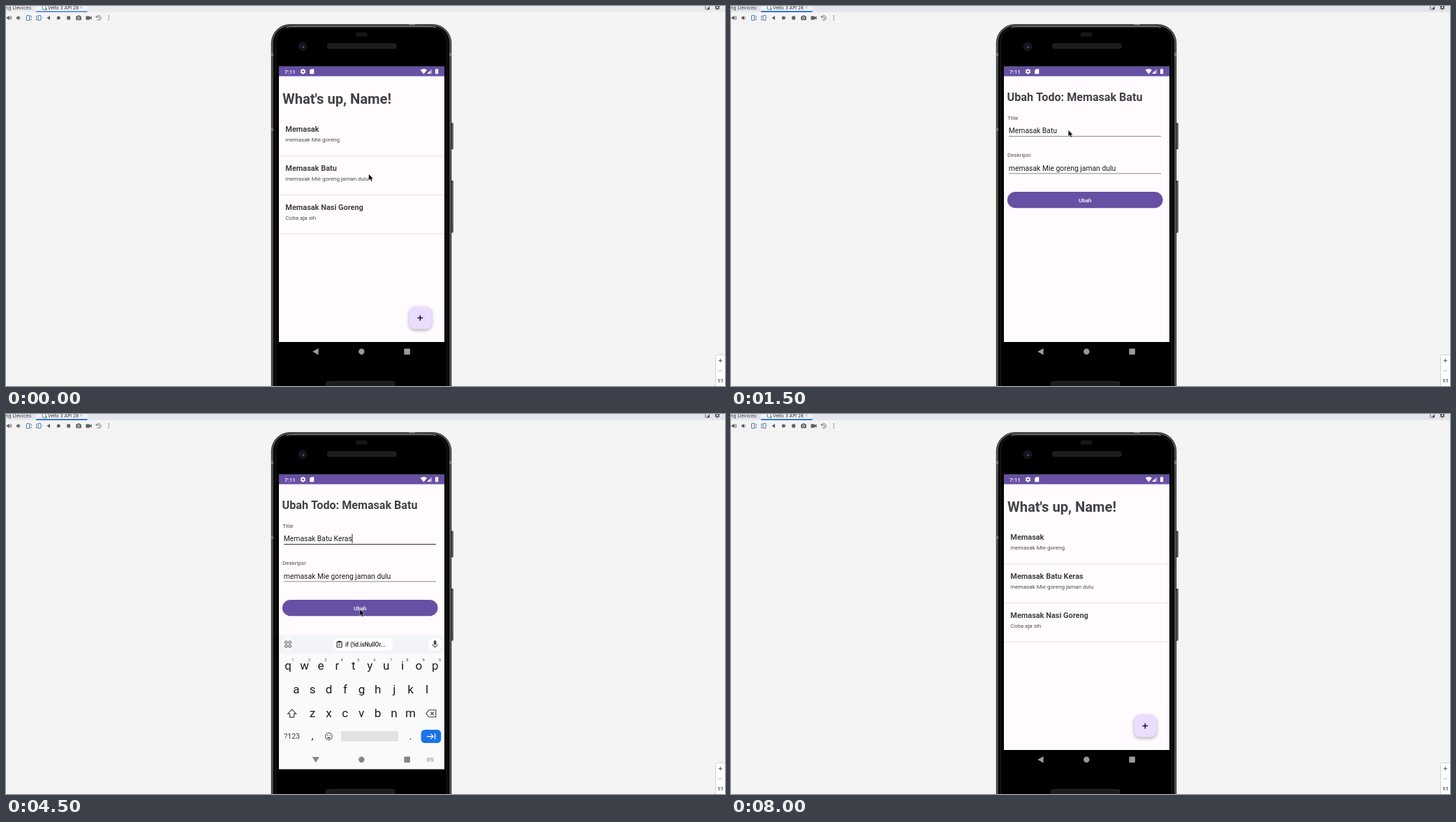
An HTML page with a canvas for the animation above (8300 ms loop, 1030 px wide and 544 px high).

```html
<!DOCTYPE html>
<html lang="id">
<head>
<meta charset="utf-8">
<title>Todo</title>
<style>
html, body { margin: 0; width: 100%; height: 100%; overflow: hidden; background: #f4f4f4; }
canvas { display: block; }
</style>
</head>
<body>
<canvas id="stage" width="1030" height="544"></canvas>
<script>
const ctx = document.getElementById('stage').getContext('2d');
const LOOP = 8300, STEP = 100;
const PURPLE = '#6750a4', PAPER = '#fffbff', INK = '#434147', KEY = '#1b1c1f', ICON = '#5f6064';
// Phone screen: left, top, width, end of status bar, start of navigation bar, bottom.
const LEFT = 390.8, TOP = 86.6, WIDTH = 237.2, BAR = 100.5, NAV = 481, BOTTOM = 508.7;
const clamp = v => Math.max(0, Math.min(1, v));

function box(x, y, w, h, r, fill, stroke, lw = 1) {
  ctx.beginPath();
  ctx.roundRect(x, y, w, h, r);
  if (fill) { ctx.fillStyle = fill; ctx.fill(); }
  if (stroke) { ctx.strokeStyle = stroke; ctx.lineWidth = lw; ctx.stroke(); }
}
const dot = (x, y, r, fill, stroke, lw) => box(x - r, y - r, 2 * r, 2 * r, r, fill, stroke, lw);
const band = (y, end, fill) => box(LEFT, y, WIDTH, end - y, 0, fill);

function text(s, x, y, size, color = INK, weight = 400, align = 'left', font = 'Roboto') {
  ctx.font = `${weight} ${size}px ${font}, sans-serif`;
  ctx.fillStyle = color;
  ctx.textAlign = align;
  ctx.fillText(s, x, y);
}

function path(d, x, y, fill, stroke, lw = 1) {
  const p = new Path2D(d);
  ctx.save();
  ctx.translate(x, y);
  if (fill) { ctx.fillStyle = fill; ctx.fill(p); }
  if (stroke) { ctx.strokeStyle = stroke; ctx.lineWidth = lw; ctx.stroke(p); }
  ctx.restore();
}

function group(draw, dx = 0, dy = 0, alpha = 1) {
  ctx.save();
  ctx.translate(dx, dy);
  ctx.globalAlpha *= alpha;
  draw();
  ctx.restore();
}

function clipBand(y, end, draw) {
  ctx.save();
  ctx.beginPath();
  ctx.rect(LEFT, y, WIDTH, Math.max(0, end - y));
  ctx.clip();
  draw();
  ctx.restore();
}

function gear(x, y, r, color, hole) {
  for (let i = 0; i < 6; i++) {
    const a = i * Math.PI / 3 + Math.PI / 6;
    path(`M0 0L${Math.cos(a) * r} ${Math.sin(a) * r}`, x, y, null, color, r * .55);
  }
  dot(x, y, r * .76, color);
  dot(x, y, r * .36, hole);
}

function ideBars(active) {
  const strip = active ? '#e2e5ed' : '#e9ebf0';
  box(0, 0, 1030, 544, 0, '#f4f4f4');
  box(0, 0, 1030, 8.5, 0, strip);
  box(0, 25, 1030, .7, 0, '#ececee');
  text('ning Devices:', 38, 4.8, 7, '#3a3b3f', 400, 'right', 'Inter');
  box(43, 0, 73.5, 7, 0, '#f0f3fa');
  box(43, 7, 73.5, 2, 0, active ? '#3574d6' : '#6f97d4');
  box(52, -1, 5, 6, 1, null, '#6c707e', .9);
  dot(57.5, 4.5, 1.5, '#59a869');
  text('Velto 3 API 28', 60, 4.8, 6.6, '#222327', 400, 'left', 'Inter');
  path('M-1.6 -1.6L1.6 1.6M1.6 -1.6L-1.6 1.6', 108, 2, null, '#9a9da6', .7);
  box(1002, -1, 5.5, 6, .5, null, '#555', .9);
  box(1005, 2, 3, 3, 0, '#555');
  gear(1019, 2, 3.5, '#555', strip);

  for (const [x, wave] of [[4, 1], [18, 0]]) {
    path('M-3 -1.4H-1.3L1 -3.2V3.2L-1.3 1.4H-3Z', x, 17, ICON);
    path(wave ? 'M2 -1.5Q3 0 2 1.5M2.6 -3Q5 0 2.6 3' : 'M2 -1.5Q3 0 2 1.5', x, 17, null, ICON, .8);
  }
  for (const [x, flip] of [[32.5, 1], [47, -1]]) {
    box(x - 2 - flip, 13.5, 4, 7, .6, null, '#3b7fc0', 1);
    path(`M${flip * 2} -3.3Q${flip * 4} -3 ${flip * 3.5} 0M${flip * 3.5} 1V3H${flip * 2}`, x, 17, null, ICON, .9);
  }
  path('M-2.6 0L2 -2.9V2.9Z', 61, 17, ICON);
  dot(75.3, 17, 2.5, ICON);
  box(87.3, 14.6, 4.8, 4.8, .3, ICON);
  box(100.3, 14.4, 7.6, 5.8, 1, ICON);
  box(102.3, 13.4, 3.6, 2, .5, ICON);
  dot(104.1, 17.2, 1.5, null, '#f7f8f9', .8);
  box(114.4, 14.4, 5.6, 5.3, .7, ICON);
  path('M0 -1L2.6 -2.4V2.4L0 1Z', 120, 17, ICON);
  path('M-3 -1.2A3.2 3.2 0 1 1 -2.6 2M-3.8 -3V-.8H-1.6M0 -1.8V.2L1.5 1', 133, 17, null, ICON, .9);
  for (const d of [-2.7, 0, 2.7]) dot(147.3, 17 + d, .8, ICON);

  box(1016.5, 499.5, 18, 50, 2, '#fff', '#cfd0d4', 1);
  path('M-2.7 0H2.7M0 -2.7V2.7', 1023.3, 507.7, null, '#444', .9);
  path('M-2.7 0H2.7', 1023.3, 522, null, '#aaa', .9);
  text('1:1', 1023.3, 538.8, 6.5, '#333', 600, 'center', 'Inter');
}

function phone() {
  for (const [y, h] of [[167.5, 37.5], [250, 74.5]]) {
    box(637, y, 3.8, h, 1, '#3c3c3c');
    box(638.7, y + 1.5, 1, h - 3, 0, '#777');
  }
  // Nested outlines of the metal rim: inset and colour.
  const rim = [[0, '#1c1c1c'], [1, '#6a6a6a'], [2.3, '#2a2a2a'], [3.6, '#000'], [6, '#2c2c2c'], [6.8, '#000']];
  for (const [d, color] of rim)
    box(379.8 + d, 26 + d * .8, 258.4 - 2 * d, 560, 27 - d, color);
  path('M402 30.4Q406 29.4 412 29.4H606Q612 29.4 616 30.4', 0, 0, null, '#999', 1);
  for (const [x, y, w, h] of [[379.8, 67, 3, 5], [635.2, 67, 3, 5], [379.8, 175, 3, 4], [577, 26, 9, 1.6]])
    box(x, y, w, h, 0, '#777');
  box(500.5, 37.5, 17.5, 6.5, 3, '#151515');
  box(460.5, 54, 98.5, 6.8, 3, '#1c1c1c', '#303030', .8);
  box(458.5, 537.5, 98.5, 8, 3, '#1c1c1c', '#303030', .8);
  dot(425, 58, 5.6, '#11121a', '#222228', 1);
  dot(425, 58, 2.8, '#171b36');
  dot(426, 59, 1, '#4f69b4');
}

function statusIcons() {
  text('7:11', 399, 96.8, 8.06, '#fff', 500);
  gear(425.5, 93.7, 3.8, '#fff', PURPLE);
  path('M-1 -3.5H3V3.5H-3V-1.5Z', 438.2, 93.7, '#fff');
  path('M0 3.8L-4.8 -2Q0 -5.2 4.8 -2Z', 598.3, 93.6, '#fff');
  path('M-3.5 3.5H3.5V-3.5Z', 606.6, 93.6, 'rgba(255,255,255,.45)');
  path('M-3.5 3.5H1V-1Z', 606.6, 93.6, '#fff');
  box(615, 90.6, 4.2, 6.6, .6, '#fff');
  box(616.2, 89.8, 1.8, 1, 0, '#fff');
}

function fab() {
  ctx.save();
  ctx.shadowColor = 'rgba(0,0,0,.3)';
  ctx.shadowBlur = 5;
  ctx.shadowOffsetY = 2;
  box(577.3, 430.3, 32.5, 32.3, 9, '#eaddff');
  ctx.restore();
  path('M-3.9 0H3.9M0 -3.9V3.9', 593.3, 446.6, null, '#21005d', 1.5);
}

// Window with the list of todos; shift moves it, bar is the offset of its status bar.
function listWindow({ title = 'Memasak Batu', shift = 0, bar = shift, resized = false, dim = 0, press = 0 }) {
  band(TOP, NAV, PAPER);
  band(TOP, BAR + bar, PURPLE);
  clipBand(TOP, NAV, () => group(() => {
    text("What's up, Name!", 396, 139.8, 20.2, INK, 700);
    const items = [['Memasak', 'memasak Mie goreng'], [title, 'memasak Mie goreng jaman dulu'],
      ['Memasak Nasi Goreng', 'Coba aja sih']];
    items.forEach(([head, body], i) => {
      const y = i * 55.85;
      if (i === 1 && press) band(214.8, 270.3, `rgba(0,0,0,${press})`);
      text(head, 400.3, 180 + y, 10.94, INK, 700);
      text(body, 400.3, 194.4 + y, 8.06, '#4d4a51');
      band(214 + y, 214.7 + y, '#dfdae0');
    });
    if (resized) box(625.3, 158.5, 2.3, 154, 0, '#99959b');
  }, 0, shift));
  group(fab, 0, resized ? -169.5 : 0);
  if (dim) band(TOP, NAV, `rgba(0,0,0,${dim})`);
}

function typed(t) {
  const tail = t < 2800 ? '' : t < 2900 ? ' K' : t < 3000 ? ' Ke' : t < 3200 ? ' Kera' : ' Keras';
  return 'Memasak Batu' + tail;
}

function editWindow(t) {
  const focus = t >= 1700, value = typed(t);
  band(TOP, NAV, PAPER);
  band(TOP, BAR, PURPLE);
  text('Ubah Todo: Memasak Batu', 395.6, 135.8, 16.13, INK, 700);
  text('Title', 396, 163, 8.06, '#4d4a51');
  text(value, 397.8, 182.2, 10.37, '#1d1b20');
  const end = 398 + ctx.measureText(value).width;
  box(398, 186, 218, focus ? 1.1 : .8, 0, focus ? '#33313a' : '#66626a');
  text('Deskripsi', 396, 216.4, 8.06, '#4d4a51');
  text('memasak Mie goreng jaman dulu', 397.8, 235.6, 10.37, '#1d1b20');
  box(398, 239.4, 218, .8, 0, '#66626a');
  box(395.8, 266, 222.8, 23.2, 11.6, PURPLE);
  if (t >= 4100 && t < 4500) {
    ctx.save();
    box(395.8, 266, 222.8, 23.2, 11.6);
    ctx.clip();
    dot(507, 280, 60 + (t - 4100) * .6, 'rgba(255,255,255,.13)');
    ctx.restore();
  }
  text('Ubah', 507.2, 280.6, 8.06, '#fff', 500, 'center');
  if (focus && (t < 3500 || t >= 4100)) box(end - .4, 171.5, 1, 13.5, 0, '#2c2833');
  if (focus && t < 2800) {
    path('M0 -7L4.4 -3H-4.4Z', 467.2, 192.4, '#625b71');
    dot(467.2, 192.6, 5.8, '#625b71');
  }
}

function keyRow(keys, x, y) {
  [...keys].forEach((k, i) => text(k, x + i * 23.4, y, 17, KEY, 400, 'center'));
}

function keyboard(pill) {
  band(316.6, NAV + 1, '#f8fafc');
  band(316.6, 343, '#f2f4f8');
  dot(404, 329.6, 9.5, '#f8f9fb');
  for (const dx of [0, 5.4]) for (const dy of [0, 5.4])
    box(399.6 + dx, 325.2 + dy, 3.4, 3.4, .8, null, '#44474b', 1);
  if (pill) {
    ctx.save();
    ctx.translate(511.5, 329.6);
    ctx.scale(pill, pill);
    box(-42.3, -8.8, 84.6, 17.6, 6, '#fff');
    box(-37.4, -3.6, 7, 8, .8, null, '#222', 1.1);
    box(-35.7, -4.8, 3.6, 2.4, .5, '#222');
    path('M-35.7 -.4H-32M-35.7 1.8H-33', 0, 0, null, '#222', .8);
    text('if (!id.isNullOr...', -25.5, 2.9, 8.3, '#202124', 500);
    ctx.restore();
  }
  dot(614.5, 329.6, 9.5, '#fff');
  box(612.8, 324, 3.6, 6.8, 1.8, '#44474b');
  path('M-3.7 -.4A3.7 3.7 0 0 0 3.7 -.4M0 3.4V5.6', 614.6, 329.6, null, '#44474b', 1);

  keyRow('qwertyuiop', 404.2, 366);
  for (let i = 0; i < 10; i++)
    text((i + 1) % 10, 411 + i * 23.4, 354, 5.8, '#44474b', 400, 'center');
  keyRow('asdfghjkl', 415.8, 400);
  keyRow('zxcvbnm', 439, 433.8);
  path('M0 -6L6 .3H3V5.3H-3V.3H-6Z', 409.6, 428.8, null, '#3c4043', 1.1);
  path('M-7 0L-3 -5H7V5H-3ZM-.6 -2.3L4 2.3M4 -2.3L-.6 2.3', 608.8, 428.8, null, '#3c4043', 1.1);
  text('?123', 409.6, 465.4, 10.6, '#3c4043', 400, 'center');
  text(',', 439, 465.6, 15, KEY, 400, 'center');
  dot(462.4, 461.5, 5, null, '#3c4043', 1);
  dot(460.6, 460.2, .8, '#3c4043');
  dot(464.2, 460.2, .8, '#3c4043');
  path('M-2.8 1A3 3 0 0 0 2.8 1Z', 462.4, 461.8, '#3c4043');
  box(480, 454, 82, 14.8, 1.5, '#e1e2e4');
  text('.', 579.6, 465.6, 15, KEY, 400, 'center');
  box(594.6, 452, 28.6, 19, 5.5, '#1a73e8');
  path('M-6 0H3M-.3 -3.5L3.2 0L-.3 3.5M5.8 -4V4', 608.8, 461.6, null, '#fff', 1.3);
}

function navBar(t) {
  const light = t >= 2000 && t < 5200, down = t >= 2000 && t < 4800;
  const color = light ? '#858585' : '#9a9a9a';
  if (light) band(NAV, BOTTOM, t < 2300 ? '#f0f0f0' : '#fafafa');
  path(down ? 'M-5 -3.8H5L0 4.4Z' : 'M-4.6 0L3.8 -4.8V4.8Z', 443.8, 494.8, color);
  dot(509.3, 494.8, 4.2, color);
  box(570.3, 490.5, 8.6, 8.6, .8, color);
  if (down) {
    box(602.8, 492, 9.6, 5.6, .6, '#bdbdbd');
    for (let i = 0; i < 4; i++) box(603.9 + i * 2.1, 493.2, 1.1, 1, 0, '#fff');
    box(605.2, 495.5, 4.8, .9, 0, '#fff');
  }
}

function toast(alpha) {
  group(() => {
    box(453, 438.5, 113, 28.6, 14.3, '#f0f1f1');
    text('Berhasil merubah Todo!', 509.4, 456.2, 8.06, '#353439', 400, 'center');
  }, 0, 0, alpha);
}

function screen(t) {
  if (t < 700) {
    listWindow({ press: t < 400 ? 0 : t < 600 ? .06 : .1 });
  } else if (t < 1200) {
    const rest = 1 - clamp((t - 700) / 425);
    const out = 1 - rest ** 1.5;
    const off = 17 * rest ** 2.2;
    listWindow({ shift: -8 * out, dim: Math.min(.11, out * .18) });
    const top = TOP + off + 422 * rest ** 4.75;
    clipBand(top, NAV + off, () => group(() => editWindow(t), 0, off));
  } else if (t < 4800) {
    editWindow(t);
  } else if (t < 5100) {
    listWindow({ shift: -7.6, bar: -5, resized: true, dim: .09 });
    if (t < 4900) clipBand(125, 495, () => group(() => editWindow(t), 0, 2));
  } else {
    listWindow({ title: 'Memasak Batu Keras', shift: t < 5200 ? -2 : 0, dim: t < 5200 ? .03 : 0 });
  }
  statusIcons();

  if (t > 1900 && t < 5200) {
    let off = t < 2400 ? 192 * (1 - (t - 1900) / 400) ** 3.8 || 0 : 0;
    if (t >= 4800) off = t < 5100 ? 1 : 60;
    const pill = t < 2200 ? 0 : 1 - .09 * clamp((2400 - t) / 200);
    clipBand(TOP, NAV + 1, () => group(() => keyboard(pill), 0, off, t < 5100 ? 1 : .5));
  }
  navBar(t);
  if (t >= 5100 && t < 7100) toast(t < 5200 ? .5 : 1 - clamp((t - 6700) / 400));
}

// Pointer stops as [time, x, y], linear between.
const TRACK = [[0, 519.6, 240.6], [100, 518.8, 241], [1000, 518.8, 241], [1200, 487, 218], [1300, 486, 199],
  [1400, 484, 184], [1500, 483.2, 177.6], [3400, 483.2, 177.6], [3500, 489, 203], [3600, 499, 245],
  [3700, 505, 270], [3800, 506.8, 279.8], [6600, 506.8, 279.8], [6700, 507, 279], [7500, 507, 279],
  [7600, 102, 37], [7700, 102, 37], [7800, 72, 19], [7900, 26, 1]];

function pointer(t) {
  if (t >= 8000) return;
  const i = Math.max(1, TRACK.findIndex(p => p[0] >= t));
  const [a, b] = [TRACK[i - 1], TRACK[i]];
  const u = (t - a[0]) / (b[0] - a[0]);
  path('M0 0V9L2.1 7.2L3.6 10.4L5.2 9.6L3.9 6.6H6.6Z', a[1] + (b[1] - a[1]) * u, a[2] + (b[2] - a[2]) * u,
    '#000', 'rgba(255,255,255,.75)', .6);
}

function render(t) {
  ideBars(t >= 400);
  phone();
  clipBand(TOP, BOTTOM, () => screen(t));
  pointer(t);
}

const start = performance.now();
function tick() {
  const t = (performance.now() - start) % LOOP;
  render(Math.floor(t / STEP) * STEP);
  requestAnimationFrame(tick);
}
tick();
</script>
</body>
</html>
```
